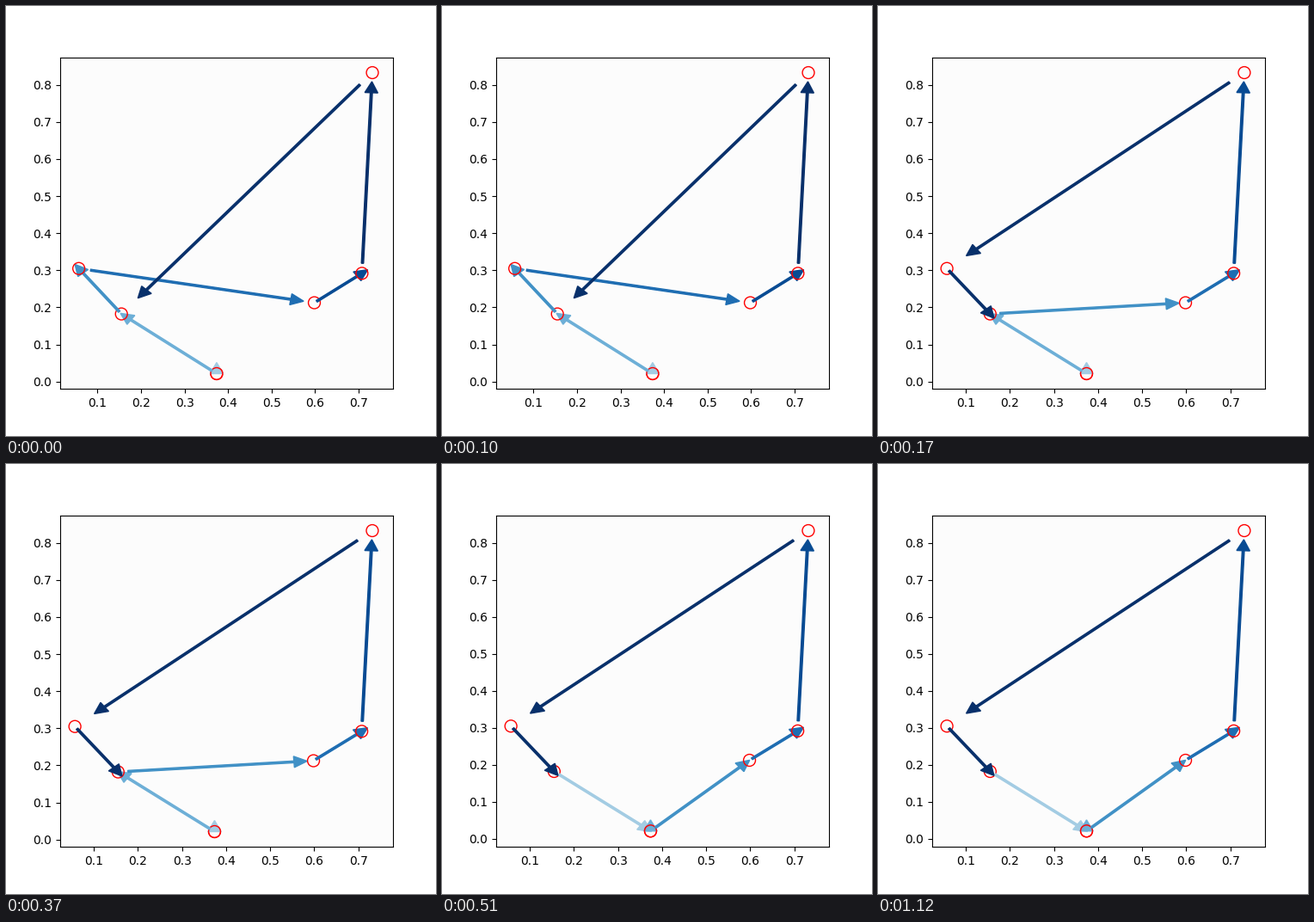
Write a matplotlib script that moves like this. It is 500 px wide and 500 px high and loops after 1530 ms.

```python
import matplotlib.pyplot as plt
from matplotlib.animation import FuncAnimation

STEP_MS = 170
STOPS = {
    "A": (0.3738, 0.0212),
    "B": (0.1550, 0.1822),
    "C": (0.0570, 0.3047),
    "D": (0.5983, 0.2124),
    "E": (0.7077, 0.2917),
    "F": (0.7317, 0.8328),
}
# Each tour with the number of steps it stays on screen.
TOURS = [("AABCDEFB", 1), ("AABDEFCB", 2), ("BAADEFCB", 6)]
SCHEDULE = [tour for tour, steps in TOURS for _ in range(steps)]

plt.rcParams["font.family"] = "DejaVu Sans"
fig, ax = plt.subplots(figsize=(5, 5), dpi=100)
ax.set_facecolor("#fcfcfc")


def draw_leg(start, end, shade):
    (x0, y0), (x1, y1) = STOPS[start], STOPS[end]
    dx, dy = x1 - x0, y1 - y0
    ax.scatter(x0, y0, s=100, facecolors="none", edgecolors="red", linewidths=1)
    ax.arrow(x0 + 0.05 * dx, y0 + 0.05 * dy, 0.85 * dx, 0.85 * dy,
             width=0.005, head_width=0.03, head_length=0.03,
             color=plt.cm.Blues(shade))


def draw(frame):
    ax.clear()
    ax.set_facecolor("#fcfcfc")
    tour = SCHEDULE[frame]
    for i, (start, end) in enumerate(zip(tour, tour[1:])):
        draw_leg(start, end, min(1.0, 0.36 + 0.134 * i))
    return []


anim = FuncAnimation(fig, draw, frames=len(SCHEDULE), init_func=lambda: [],
                     interval=STEP_MS, repeat=True, repeat_delay=0)
plt.show()
```
